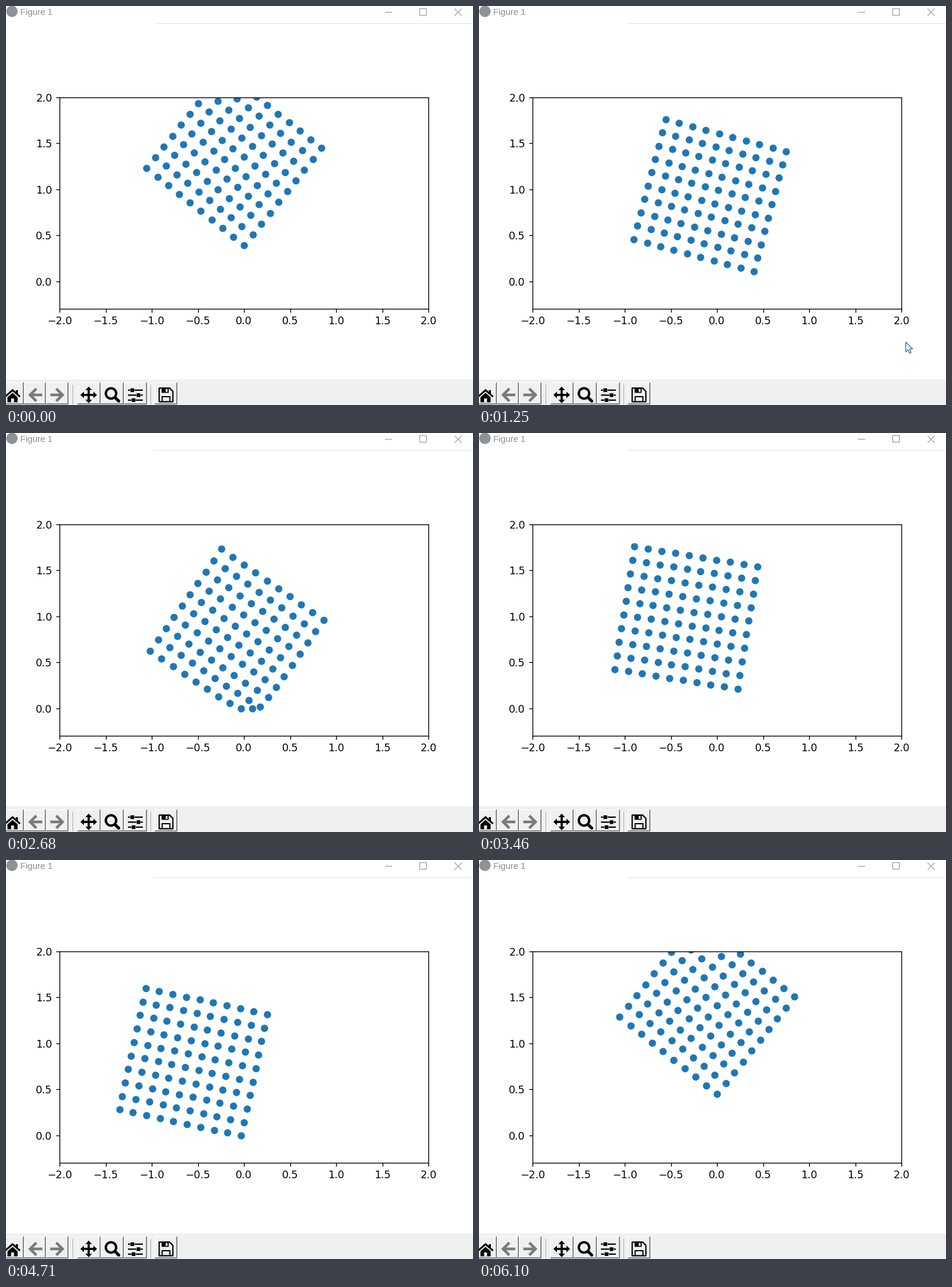
Recreate the animation shown at these times as a matplotlib script. Size 785 by 672 pixels, loop 6170 ms.

```python
from collections import namedtuple
from itertools import product

import numpy as np
import matplotlib.pyplot as plt
from matplotlib.animation import FuncAnimation
from matplotlib.patches import Circle, Polygon, Rectangle

W, H, DPI = 785, 672, 125
LOOP, FRAMES = 6170, 79
PX = 72 / DPI  # points per pixel

GRAVITY = 0.98
RESTART, CYCLE = 5.854, 6.272  # the body is dropped anew at RESTART seconds

# Free flights: position and angle are given at the apex of each arc.
Flight = namedtuple("Flight", "start end apex x y vx deg spin")
FLIGHTS = [
    Flight(-0.50, 0.570, -0.418, -0.1075, 1.424, 0, np.degrees(0.9), 0),
    Flight(1.130, 2.655, 1.847, -0.0766, 1.111, 0, 104.8, 49.8),
    Flight(3.000, 4.035, 3.396, -0.323, 0.985, -0.312, 169.5, 32),
    Flight(4.300, 4.686, 4.458, -0.538, 0.8225, -0.05, 182.65, -65),
    Flight(5.080, 5.900, 5.386, -0.527, 0.876, 0, 173.2, 30),
]

side = np.linspace(-0.675, 0.675, 10)
GRID = np.array(list(product(side, side))).T


def coast(f, t):
    """Position (x, y, angle) and velocity on a ballistic arc."""
    s = t - f.apex
    pos = np.array([f.x + f.vx * s, f.y - GRAVITY / 2 * s**2, f.deg + f.spin * s])
    return pos, np.array([f.vx, -GRAVITY * s, f.spin])


def pose(t):
    if t >= RESTART:
        t -= CYCLE
    k = max(i for i, f in enumerate(FLIGHTS) if f.start <= t)
    f = FLIGHTS[k]
    if t <= f.end:
        return coast(f, t)[0]
    # soft floor contact: smooth cubic into the next flight
    g = FLIGHTS[k + 1]
    (p0, v0), (p1, v1) = coast(f, f.end), coast(g, g.start)
    dt = g.start - f.end
    s = (t - f.end) / dt
    blend = s * s * (3 - 2 * s)
    return (p0 + (p1 - p0) * blend
            + dt * s * (1 - s) * (v0 * (1 - s) - v1 * s))


def body(t):
    x, y, deg = pose(t)
    c, s = np.cos(np.radians(deg)), np.sin(np.radians(deg))
    px, py = np.array([[c, -s], [s, c]]) @ GRID
    py += y
    depth = max(0, -py.min())
    squash = 0.25 * depth * np.exp(-py / 0.2)
    return px + x, np.maximum(py + squash, 0)


def ease(t, start, end):
    s = np.clip((t - start) / (end - start), 0, 1)
    return s * s * (3 - 2 * s)


def cursor_tip(t):
    rest, entry, leave = np.array([(717.5, 566), (16, 120), (40, 120)])
    return rest + entry * (1 - ease(t, 0.32, 0.74)) + leave * ease(t, 1.5, 2.085)


fig = plt.figure(figsize=(W / DPI, H / DPI), dpi=DPI, facecolor="white")
win = fig.add_axes([0, 0, 1, 1])
win.set(xlim=(0, W), ylim=(H, 0))
win.axis("off")


def line(xs, ys, color="black", width=1.0, cap="butt"):
    win.plot(xs, ys, color=color, lw=width * PX, snap=False,
             solid_capstyle=cap, solid_joinstyle="miter")


def rect(x0, y0, x1, y1, color="black", z=3):
    win.add_patch(Rectangle((x0, y0), x1 - x0, y1 - y0, fc=color, lw=0,
                            zorder=z, snap=False))


def poly(points, color="black", **kw):
    return win.add_patch(Polygon(points, fc=color, snap=False, **{"lw": 0, **kw}))


def title_bar():
    gray = "#8c8c8c"
    win.add_patch(Circle((10, 9), 9.5, fc="#8f9296", lw=0))
    win.text(24.5, 15, "Figure 1", family="Liberation Sans", size=14.6 * PX,
             color=gray, va="baseline")
    line([637, 649], [10.5, 10.5], gray)
    poly([(695.5, 4.5), (706.5, 4.5), (706.5, 15.5), (695.5, 15.5)], "white",
         ec=gray, lw=PX)
    line([754, 766], [4.5, 16.5], gray)
    line([754, 766], [16.5, 4.5], gray)
    line([250, W], [29.5, 29.5], "#e3e3e3")


def button(x0, x1, y0=634, y1=671):
    line([x0 + .5, x0 + .5, x1], [y1, y0 + .5, y0 + .5], "white")
    line([x0 + 1, x1 - 1.5, x1 - 1.5], [y1 - 1.5, y1 - 1.5, y0 + 1], "#a0a0a0")
    line([x0, x1 - .5, x1 - .5], [y1 - .5, y1 - .5, y0], "#696969")


def home_icon(x):
    line([x - 12.5, x, x + 12.5], [658, 647, 658], width=3)
    rect(x + 5.5, 647, x + 9, 654)
    poly([(x - 8.5, 659), (x, 651.5), (x + 8.5, 659), (x + 8.5, 667.5),
          (x - 8.5, 667.5)])
    rect(x - 2.5, 661, x + 2.5, 667.5, "#f0f0f0")


def step_icon(x, way):
    gray = "#7a7a7a"
    line([x - 11.5 * way, x + 9 * way], [655, 655], gray, 4.5)
    line([x - 1.5 * way, x + 9 * way, x - 1.5 * way], [644.5, 655, 665.5], gray, 4.5)


def move_icon(x, y):
    line([x - 10, x + 10], [y, y], width=3.6)
    line([x, x], [y - 10, y + 10], width=3.6)
    for dx, dy in ((1, 0), (-1, 0), (0, 1), (0, -1)):
        bx, by = x + 8 * dx, y + 8 * dy
        poly([(x + 14 * dx, y + 14 * dy), (bx + 5.5 * dy, by + 5.5 * dx),
              (bx - 5.5 * dy, by - 5.5 * dx)])


def zoom_icon(x, y):
    win.add_patch(Circle((x, y), 8.7, fill=False, ec="black", lw=4 * PX))
    line([x + 6.5, x + 13], [y + 6.5, y + 13], width=5, cap="round")


def sliders_icon(x):
    for row, knob in enumerate((7.3, 17.7, 9.4)):
        y = 647 + 8.4 * row
        line([x, x + 25], [y, y], width=2.2)
        rect(x + knob - 3.7, y - 3, x + knob + 3.7, y + 3, "#f0f0f0")
        rect(x + knob - 3.1, y - 3.1, x + knob + 3.1, y + 3.1)


def save_icon(x, y):
    poly([(x, y), (x + 17.5, y), (x + 23, y + 5.5), (x + 23, y + 23), (x, y + 23)],
         "#f0f0f0", ec="black", lw=2.2 * PX, joinstyle="round")
    rect(x + 4, y, x + 16, y + 8)
    rect(x + 11, y + 1.5, x + 14, y + 6.5, "#f0f0f0")
    line([x + 5, x + 5, x + 18, x + 18], [y + 22.5, y + 14.5, y + 14.5, y + 22.5],
         width=2)


def toolbar():
    rect(0, 629, W, H, "#f0f0f0", z=0)
    for left, pitch, count in ((-8, 37.6, 3), (120, 39, 3), (250, 38, 1)):
        for i in range(count):
            button(round(left + i * pitch), round(left + (i + 1) * pitch))
    for x in (112, 243):
        line([x + .5, x + .5], [638, 671], "#a0a0a0")
        line([x + 1.5, x + 1.5], [638, 671], "white")
    home_icon(11)
    step_icon(49.5, -1)
    step_icon(86, 1)
    move_icon(139, 655)
    zoom_icon(176.5, 652.5)
    sliders_icon(205)
    save_icon(257.5, 643.5)


title_bar()
toolbar()
ARROW = np.array([(0, 0), (0, 16.5), (3.8, 13), (6.3, 18.8), (8.8, 17.7),
                  (6.4, 12), (11.3, 11.5)])
cursor = poly(ARROW, "white", ec="#164a75", lw=1.1 * PX, zorder=6)

ax = fig.add_axes([90 / W, 161.75 / H, 620 / W, 356.5 / H], facecolor="none")
ax.set(xlim=(-2, 2), ylim=(-0.3, 2), xticks=np.arange(-2, 2.1, 0.5),
       yticks=np.arange(0, 2.1, 0.5))
dots, = ax.plot([], [], "o", color="#1f77b4")


def update(i):
    t = i * LOOP / FRAMES / 1000
    dots.set_data(*body(t))
    cursor.set_xy(ARROW + cursor_tip(t))
    return dots, cursor


anim = FuncAnimation(fig, update, frames=FRAMES, interval=LOOP / FRAMES,
                     init_func=lambda: update(0), repeat=True, repeat_delay=0,
                     blit=False)
plt.show()
```
